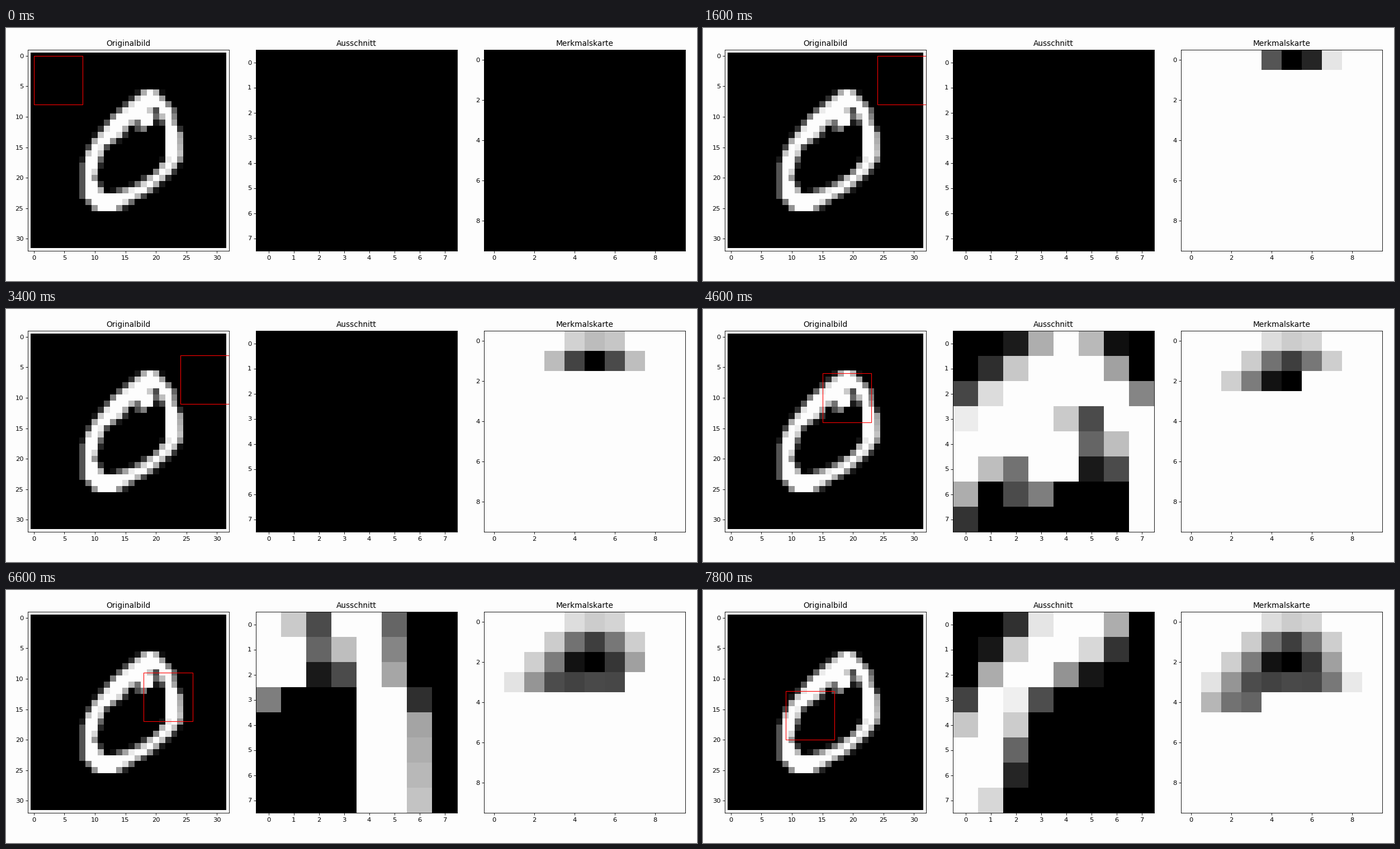
These frames come from a looping animation (1236 by 453 pixels, 8 s). A matplotlib script:

```python
import numpy as np
import matplotlib.pyplot as plt
from matplotlib.animation import FuncAnimation
from matplotlib.colors import LinearSegmentedColormap
from matplotlib.patches import Rectangle

W, H, DPI = 1236, 453, 80
SIZE, WIN, STRIDE = 32, 8, 3
STEPS = (SIZE - WIN) // STRIDE + 1
FRAMES, INTERVAL = 40, 200
WHITE = "#fdfdfd"
GRAY = LinearSegmentedColormap.from_list("paper", ["black", WHITE])

# Key points (row, x) along the digit's contours.
OUTER_LEFT = [(6, 18.2), (10, 13.5), (14, 10.3), (16, 9.2), (18, 8.67),
              (23, 8.67), (25, 10.4)]
OUTER_RIGHT = [(6, 20.8), (9, 23.4), (11, 23.66), (13, 24.65), (16, 24.77),
               (17, 24.58), (19, 23.1), (22, 19.65), (25, 14.7)]
HOLE_LEFT = [(12, 15.7), (13, 15.06), (15, 12.25), (17, 11.4), (20, 10.6),
             (22, 11.75)]
HOLE_RIGHT = [(12, 22), (17, 22), (19, 20.45), (21, 17.6), (22, 15)]

# Short strokes (row, start, end): cracks in the ink and a fleck in the hole.
CRACKS = [(9, 19.8, 20.7), (10, 20.4, 21.25), (11, 20.1, 21.7), (11, 16.75, 17.55)]
FLECK = (12, 17.7, 18.5)


def cover(edge, soft=.3):
    """Share of every cell in a row that lies right of a soft edge."""
    t = np.arange(SIZE + 1) - edge
    ramp = np.clip(t / soft + .5, 0, 1)
    return np.diff(soft * ramp ** 2 / 2 + np.maximum(t - soft / 2, 0))


def side(points):
    """Coverage right of a contour; flatter slopes give softer edges."""
    ys, xs = zip(*points)
    rows = np.arange(ys[0], ys[-1] + 1)
    edge = np.interp(rows, ys, xs)
    soft = np.hypot(.4, 1.3 * np.gradient(edge))
    return rows, np.array([cover(e, s) for e, s in zip(edge, soft)])


def region(left, right):
    img = np.zeros((SIZE, SIZE))
    rows, start = side(left)
    img[rows] = start - side(right)[1]
    return img


def stroke(row, start, end):
    img = np.zeros((SIZE, SIZE))
    img[row] = cover(start) - cover(end)
    return img


def snap(a):
    """Settle near-black and near-white tones."""
    return np.where(a < .055, 0, np.where(a > .945, 1, a))


def stretch(a):
    span = np.ptp(a)
    return snap((a - a.min()) / span) if span else np.zeros_like(a)


def window(k):
    row, col = divmod(k, STEPS)
    return col * STRIDE, row * STRIDE


def crop(k):
    x, y = window(k)
    return digit[y:y + WIN, x:x + WIN]


def feature_map(k):
    out = np.zeros((10, 10))
    for j in range(k + 1):
        out[divmod(j, STEPS)] = -crop(j).sum()
    return out


def panel(i, title, data, ticks):
    ax = fig.add_axes([(39 + 408 * i) / W, 54 / H, 360 / W, 360 / H],
                      facecolor=WHITE)
    img = ax.imshow(data, cmap=GRAY, vmin=0, vmax=1,
                    interpolation="nearest", aspect="auto")
    ax.set_title(title)
    ax.set_xticks(ticks)
    ax.set_yticks(ticks)
    return ax, img


plt.rcParams.update({"font.family": "DejaVu Sans", "font.size": 10.3})
digit = snap(region(OUTER_LEFT, OUTER_RIGHT) - region(HOLE_LEFT, HOLE_RIGHT)
             - sum(stroke(*c) for c in CRACKS) + stroke(*FLECK))
fig = plt.figure(figsize=(W / DPI, H / DPI), dpi=DPI, facecolor=WHITE)

ax, _ = panel(0, "Originalbild", digit, range(0, 31, 5))
ax.set_xlim(-1, SIZE)
ax.set_ylim(SIZE, -1)
frame_box = ax.add_patch(Rectangle((0, 0), WIN, WIN, fill=False, ec="red", lw=1))
_, crop_img = panel(1, "Ausschnitt", np.zeros((WIN, WIN)), range(WIN))
_, map_img = panel(2, "Merkmalskarte", np.zeros((10, 10)), range(0, 10, 2))


def update(k):
    frame_box.set_xy(window(k))
    crop_img.set_data(stretch(crop(k)))
    map_img.set_data(stretch(feature_map(k)))
    return frame_box, crop_img, map_img


anim = FuncAnimation(fig, update, frames=FRAMES, interval=INTERVAL,
                     repeat=True, repeat_delay=0, blit=False)
plt.show()
```
